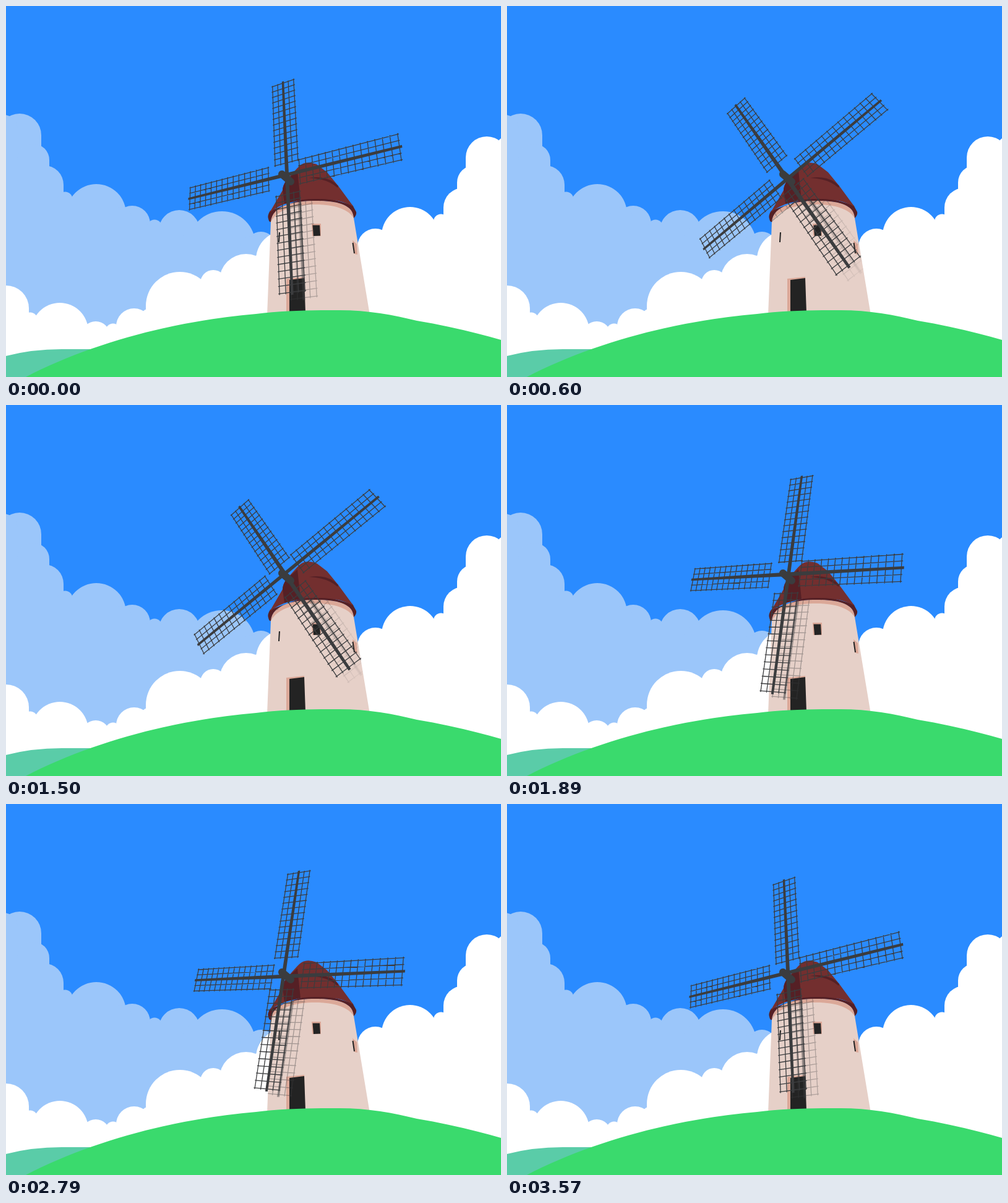
An HTML page that plays this animation: 800x600 px, repeating every 3600 ms.

```html
<!DOCTYPE html>
<html lang="en">
<head>
<meta charset="utf-8">
<title>Windmill</title>
<style>
  html, body { margin: 0; width: 100%; height: 100%; overflow: hidden; background: #2a8bff; }
  svg { display: block; width: 800px; height: 600px; }
</style>
</head>
<body>
<svg viewBox="0 0 800 600">
  <defs>
    <path id="wall" d="M428 349C430 322 468 315 500 315C535 315 561 321 562 343L588 500H422Z"/>
    <clipPath id="wallClip"><use href="#wall"/></clipPath>
    <linearGradient id="shade" gradientUnits="userSpaceOnUse" x1="420" x2="550" y1="0" y2="0">
      <stop offset=".3" stop-color="#3b3c3e" stop-opacity=".4"/>
      <stop offset="1" stop-color="#3b3c3e" stop-opacity=".06"/>
    </linearGradient>
  </defs>
  <g id="backClouds" fill="#9bc6fa"></g>
  <g id="frontClouds" fill="#fff"></g>
  <path fill="#5acca8" d="M0 566Q42 555 90 555H140V600H0Z"/>

  <use href="#wall" fill="#e6d0c8"/>
  <g fill="#dba898">
    <path d="M428 349C430 322 468 315 500 315C535 315 561 321 562 343C553 328 530 321 500 321C468 321 440 328 428 349Z"/>
    <path d="M453 441L482 438L483 496H453ZM494 352H509V372H495ZM560 379L567 385L568 402L563 401Z"/>
  </g>
  <g fill="#232323" stroke="#232323">
    <path stroke="none" d="M458 443L482 440L484 496H458ZM495.500 354.500H507L508 371.500L497 372Z"/>
    <path stroke-width="2" d="M442 366L441 382M560.500 383L563 400"/>
  </g>
  <g clip-path="url(#wallClip)">
    <g id="shadow" transform="translate(19 9)"></g>
  </g>

  <g fill="#552025">
    <path d="M427 331Q422 339 424 344Q425 350 428 349C430 322 468 315 500 315C535 315 561 321 562 343Q567 338 566 333L560 322L500 305Z"/>
    <path fill="#732f2f" d="M426 334L447 298Q447 292 452 283L470 263Q477 255 483 254Q491 252 502 256L519 269L537 291L562 325C545 315 525 312 500 312C470 312 445 319 426 334Z"/>
    <path d="M447 298Q447 290 454 281L471 266L476 314L450 320ZM490 278Q520 273 537 291L536 294Q518 279 490 278Z"/>
  </g>

  <path fill="#3ada6d" d="M32 600C140 544 275 509 404 498C445 493 485 492 530 492C580 491 625 499 664 509C712 517 758 528 800 540V600Z"/>
  <g id="rotor"></g>
  <path stroke="#3b3c3e" stroke-width="12" stroke-linecap="round" d="M446 272L460 284"/>
</svg>
<script>
const NS = 'http://www.w3.org/2000/svg';
const el = id => document.getElementById(id);

function add(parent, tag, attrs) {
  const node = document.createElementNS(NS, tag);
  for (const key in attrs) node.setAttribute(key, attrs[key]);
  return parent.appendChild(node);
}

// A puff is a round-topped column; a smaller one fills the valley between two neighbours
function drawCloud(id, puffs) {
  const puff = (x, y, r) =>
    add(el(id), 'rect', { x: x - r, y: y - r, width: 2 * r, height: 900, rx: r });
  puffs.forEach(([x, y, r], i) => {
    puff(x, y, r);
    if (!i) return;
    const [px, py, pr] = puffs[i - 1];
    const left = px + pr, right = x - r;
    puff((left + right) / 2, (py + y) / 2, Math.max(12, left - right));
  });
}

drawCloud('backClouds', [[-2, 186, 10], [22, 209, 35], [62, 289, 31], [146, 336, 48],
  [204, 352, 29], [280, 363, 33], [349, 386, 54], [412, 390, 25]]);
drawCloud('frontClouds', [[0, 489, 37], [87, 526, 46], [145, 533, 23], [207, 518, 29],
  [281, 485, 55], [335, 448, 21], [388, 444, 43], [450, 410, 46]]);
drawCloud('frontClouds', [[597, 389, 29], [653, 371, 46], [739, 326, 32], [777, 245, 34], [812, 230, 20]]);

// Two crossed spars, one slightly in front of the other
const spars = [
  { x: 454.3, y: 278.6, size: 1, turn: 0 },
  { x: 449, y: 274, size: 1.01, turn: Math.PI / 2 }
];
for (const spar of spars) {
  spar.grids = [];
  spar.beams = [];
  for (const [id, paint] of [['shadow', 'url(#shade)'], ['rotor', '#3b3c3e']]) {
    spar.grids.push(add(el(id), 'path', { stroke: paint, fill: 'none', 'stroke-width': 1.3 }));
    spar.beams.push(add(el(id), 'path', { fill: paint }));
  }
}

// Perspective view of the tilted wheel; r runs along the spar, e across it
function project(spar, angle, r, e) {
  const c = Math.cos(angle), s = Math.sin(angle);
  const up = r * c - e * s, side = r * s + e * c;
  const k = spar.size / (1 + 0.092 * up - 0.106 * side);
  const x = spar.x + k * (169.2 * side - 7.5 * up);
  const y = spar.y - k * (171 * up + 41.7 * side);
  return x.toFixed(2) + ' ' + y.toFixed(2);
}

const GAPS = 14, INNER = 0.147, OUTER = 0.98, HALF_WIDTH = 0.12, RAIL_GAP = 0.055;

function drawSpar(spar, theta) {
  const at = (r, e) => project(spar, theta + spar.turn, r, e);
  let grid = '';
  for (const side of [1, -1]) {
    for (let i = 0; i <= GAPS; i++) {
      const r = side * (INNER + (OUTER - INNER) * i / GAPS);
      grid += `M${at(r, -HALF_WIDTH)}L${at(r, HALF_WIDTH)}`;
    }
    for (let rail = -2; rail <= 2; rail++)
      grid += `M${at(side * (INNER - 0.01), rail * RAIL_GAP)}L${at(side * (OUTER + 0.01), rail * RAIL_GAP)}`;
  }
  const tip = 0.011, mid = 0.018;
  const beam = `M${at(1, tip)}L${at(0, mid)}L${at(-1, tip)}L${at(-1, -tip)}L${at(0, -mid)}L${at(1, -tip)}Z`;
  spar.grids.forEach(p => p.setAttribute('d', grid));
  spar.beams.forEach(p => p.setAttribute('d', beam));
}

const LOOP = 3600, STEP = 30, TURN_STEPS = 119;

function frame() {
  const step = Math.floor(performance.now() % LOOP / STEP);
  const theta = step / TURN_STEPS * 2 * Math.PI;
  spars.forEach(spar => drawSpar(spar, theta));
  requestAnimationFrame(frame);
}
frame();
</script>
</body>
</html>
```
